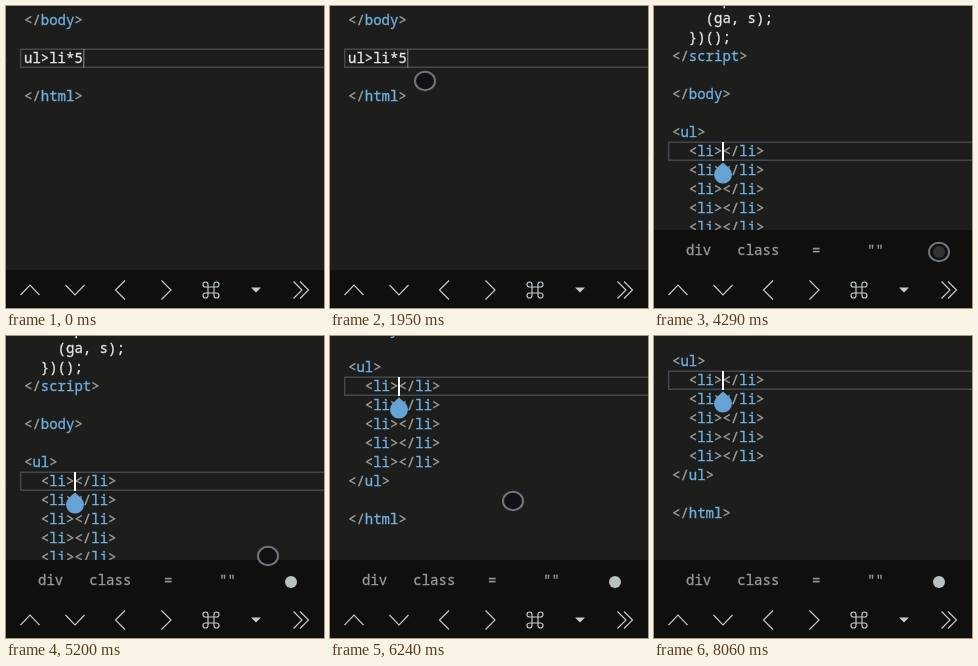
An HTML page that plays this animation: 318 by 302 pixels, repeating every 8190 ms.

```html
<!DOCTYPE html>
<html lang="en">
<head>
<meta charset="utf-8">
<title>Abbreviation expansion</title>
<style>
  html, body { margin: 0; width: 100%; height: 100%; overflow: hidden; background: #1d1e1c; }
  svg { display: block; width: 318px; height: 302px; }
  text { font: 14px "Noto Sans Mono", "DejaVu Sans Mono", monospace; fill: #e6e8e6; stroke: #e6e8e6; stroke-width: .3; }
  .punct { fill: #9da3a3; stroke: #9da3a3; }
  .tag { fill: #6fb0e2; stroke: #6fb0e2; }
  .bar { fill: #0f100e; }
  .keys text { fill: #969a98; stroke: #969a98; }
  .icons { fill: none; stroke: #c3cccf; stroke-width: 1.15; }
  text.number { fill: #8b8f8d; stroke: none; }
</style>
</head>
<body>
<svg viewBox="0 0 318 302">
  <g id="page">
    <g id="current">
      <path d="M320-8.7H14.7V9.2H320" fill="none" stroke="#43484f" stroke-width="1.5"/>
      <text class="number" x="-7.2" y="5">8</text>
    </g>
    <g id="common"></g>
    <g id="before"></g>
    <g id="after"></g>
    <g id="caret">
      <rect id="bar" y="-9" height="19"/>
      <path id="handle" d="M0 11.5L6.4 17.2A9 9 0 1 1-6.4 17.2Z" fill="#66a2d4"/>
    </g>
  </g>
  <g id="keys" class="keys">
    <rect class="bar" y="224" width="318" height="41"/>
    <text x="32" y="249">div</text>
    <text x="83.3" y="249">class</text>
    <text x="158" y="249">=</text>
    <text x="213" y="249">""</text>
    <circle cx="285" cy="246" r="6" fill="#b9c1c2"/>
  </g>
  <rect class="bar" y="264" width="318" height="38"/>
  <g class="icons">
    <path d="M14.5 289L24 279 33.5 289M59.5 279L69 289 78.5 279"/>
    <path d="M119 274.5L109.5 284 119 293.5M155.5 274.5L165 284 155.5 293.5"/>
    <path transform="translate(205 284)" d="M-3-5.5V5.5A2.5 2.5 0 1 1-5.5 3H5.5A2.5 2.5 0 1 1 3 5.5V-5.5A2.5 2.5 0 1 1 5.5-3H-5.5A2.5 2.5 0 1 1-3-5.5Z"/>
    <path d="M245 281.5H255L250 286.5Z" fill="#c3cccf" stroke="none"/>
    <path d="M287.5 275.5L296 284 287.5 292.5M294 275.5L302.5 284 294 292.5"/>
  </g>
  <ellipse id="pointer" rx="10" ry="9.3" fill="#0e0f11" fill-opacity=".8" stroke="#70767b" stroke-width="2"/>
</svg>
<script>
const LOOP = 8190, STEP = 130;
const LEFT = 18, CHAR = 8.4, LINE = 19, ROW0 = 52;
const TAP = 2080, KEYS = 2210, EXPAND = 4290;
const $ = id => document.getElementById(id);
const rowY = row => ROW0 + row * LINE;

function addLine(group, row, indent, code) {
  const text = document.createElementNS("http://www.w3.org/2000/svg", "text");
  text.setAttribute("x", LEFT + indent * CHAR);
  text.setAttribute("y", rowY(row) + 5);
  text.innerHTML = code.replace(/<(\/?)(\w+)>/g,
    '<tspan class="punct">&lt;$1</tspan><tspan class="tag">$2</tspan><tspan class="punct">&gt;</tspan>');
  $(group).append(text);
}

addLine("common", -7, 4, "s.parentNode.insertBefore");
addLine("common", -6, 4, "(ga, s);");
addLine("common", -5, 2, "})();");
addLine("common", -4, 0, "</" + "script>");
addLine("common", -2, 0, "</body>");
addLine("before", 0, 0, "ul&gt;li*5");
addLine("before", 2, 0, "</html>");
addLine("after", 0, 0, "<ul>");
for (let row = 1; row <= 5; row++) addLine("after", row, 2, "<li></li>");
addLine("after", 6, 0, "</ul>");
addLine("after", 8, 0, "</html>");

// Each key is [time, ...values].
const scroll = [[2080, 0], [2340, 50], [2600, 74], [5460, 74], [5720, 35],
  [5980, -3], [6110, -14], [6240, -21], [6500, -21], [6630, -27]];
const pointer = [[910, 185, 160], [1820, 95, 75], [2860, 95, 75], [3250, 229, 179],
  [3770, 285, 246], [5070, 285, 246], [5200, 262, 220], [5590, 183, 165]];
const opacity = [[910, 0], [1040, 1], [7150, 1], [7800, 0]];

function sample(keys, time) {
  const next = keys.findIndex(key => key[0] > time);
  if (next < 0) return keys[keys.length - 1].slice(1);
  if (next === 0) return keys[0].slice(1);
  const a = keys[next - 1], b = keys[next];
  const k = (time - a[0]) / (b[0] - a[0]);
  return a.slice(1).map((v, i) => v + (b[i + 1] - v) * k);
}

const move = (id, x, y) => $(id).setAttribute("transform", `translate(${x} ${y})`);
const show = (id, on) => $(id).setAttribute("visibility", on ? "visible" : "hidden");

function draw(now) {
  const time = Math.floor(now % LOOP / STEP) * STEP;
  const focused = time >= TAP, expanded = time >= EXPAND;
  const y = rowY(expanded ? 1 : 0);
  move("page", 0, sample(scroll, time)[0]);
  move("current", 0, y);
  move("caret", expanded ? 69 : 78, y);
  $("bar").setAttribute("x", focused ? -1 : -0.7);
  $("bar").setAttribute("width", focused ? 2 : 1);
  $("bar").setAttribute("fill", focused ? "#fff" : "#8a8e90");
  show("handle", focused);
  show("before", !expanded);
  show("after", expanded);
  show("keys", time >= KEYS);
  move("pointer", ...sample(pointer, time));
  $("pointer").setAttribute("opacity", sample(opacity, time)[0]);
}

const start = performance.now();
function tick() {
  draw(performance.now() - start);
  requestAnimationFrame(tick);
}
tick();
</script>
</body>
</html>
```
